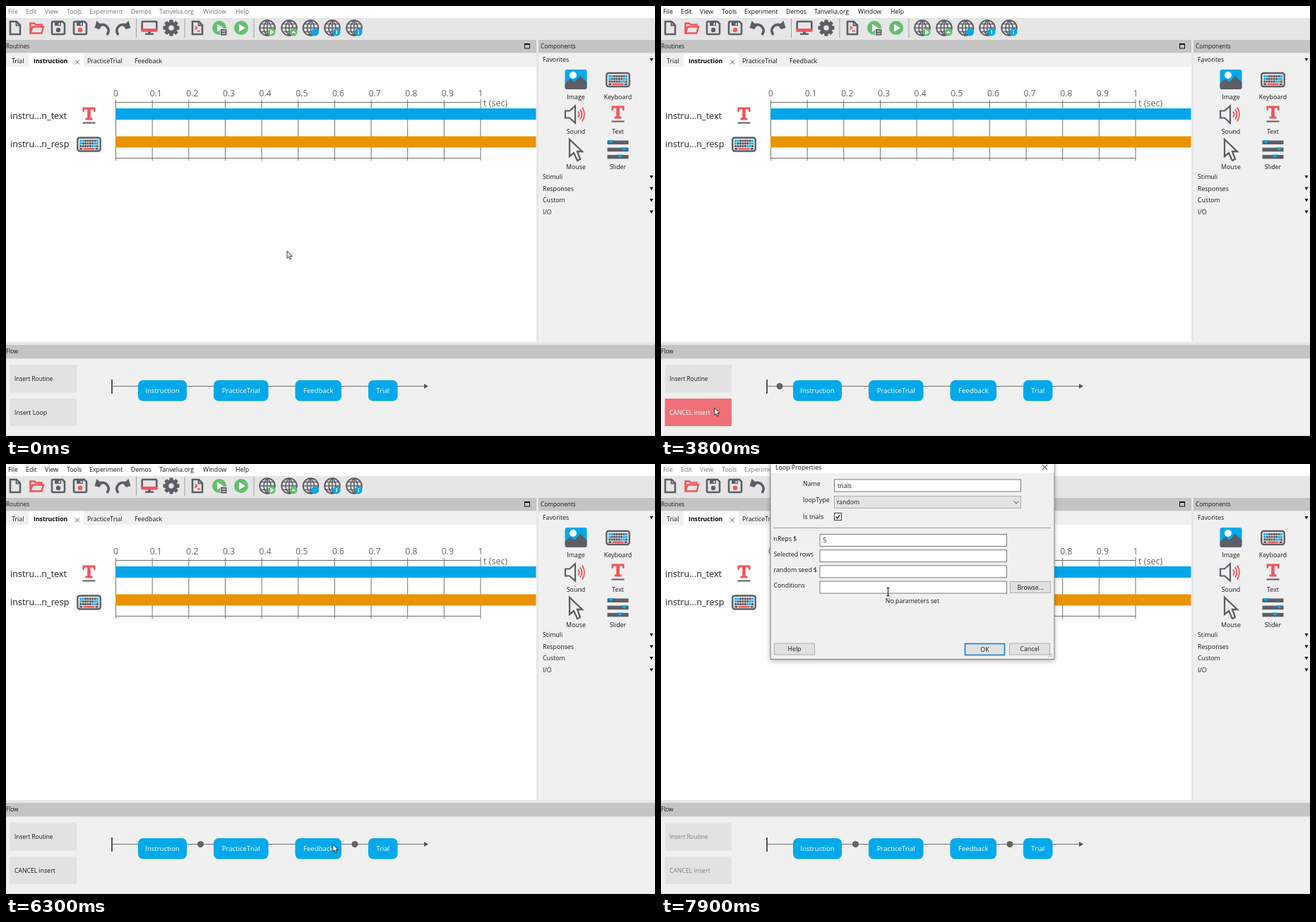
An HTML page that plays this animation: 919x609 px, repeating every 8 s.

```html
<!DOCTYPE html>
<html>
<head>
<meta charset="utf-8">
<style>
html, body { margin: 0; width: 100%; height: 100%; overflow: hidden; background: #e6e6e6; }
svg { display: block; width: 919px; height: 609px; }
text { font-family: "Open Sans", "Noto Sans", sans-serif; white-space: pre; }
</style>
</head>
<body>
<script>
const GREY = '#5e5e66', RED = '#f2545b', BLUE = '#02a9ea', GREEN = '#62c16b';
const PANEL = '#f0f0f0', FRAME = '#e6e6e6';

// SVG helpers; text is placed by its vertical middle
const rect = (x, y, w, h, fill, more = '') =>
  `<rect x="${x}" y="${y}" width="${w}" height="${h}" fill="${fill}" ${more}/>`;
const text = (x, y, s, size = 8.8, fill = '#1a1a1a', more = '') =>
  `<text x="${x}" y="${y + size * 0.35}" font-size="${size}" fill="${fill}" ${more}>${s}</text>`;
const label = (x, y, s, size, fill) => text(x, y, s, size, fill, 'text-anchor="middle"');
const path = (d, fill = 'none', stroke = 'none', width = 1) =>
  `<path d="${d}" fill="${fill}" stroke="${stroke}" stroke-width="${width}"/>`;
const line = (d, color = GREY, width = 2.6) => path(d, 'none', color, width);
const circle = (x, y, r, fill, more = '') => `<circle cx="${x}" cy="${y}" r="${r}" fill="${fill}" ${more}/>`;
const at = (x, y, ...parts) => `<g transform="translate(${x} ${y})">${parts.join('')}</g>`;
const list = (n, f) => Array.from({ length: n }, (_, i) => f(i)).join('');

// Icons, all drawn around 0,0
const page = line('M-7-9H2L7-4V9H-7Z') + line('M1.5-9V-3.5H7', GREY, 1.8);
const folder = line('M-8.5 7V-6.5H-3L-1-4.5H7.5V-1', RED) + path('M-8.5 7.5L-5.5-1.5H10L7.5 7.5Z', FRAME, RED, 2.4);
const floppy = mark => line('M-9-7Q-9-9-7-9H6L9-6V7Q9 9 7 9H-7Q-9 9-9 7Z') +
  rect(-5, -8, 9, 5, GREY) + rect(0.5, -7, 2, 3, FRAME) + circle(0, 3, 3.2, mark);
const undo = line('M-7-3Q5-8 9 2Q10 5 7 10', GREY, 3.6) + path('M-10.5 0L-7.5-10L0-3L-4 2Z', GREY);
const redo = `<g transform="scale(-1 1)">${undo}</g>`;
const monitor = rect(-10.3, -9, 20.6, 13, FRAME, `rx="1" stroke="${GREY}" stroke-width="2.6"`) +
  rect(-11.5, 1, 23, 4.5, RED, 'rx="1"') + rect(-2, 5.5, 4, 3, GREY) + rect(-6, 7.5, 12, 2.4, GREY);
const gear = list(8, i => rect(-2.7, -11.5, 5.4, 6, GREY, `rx="1" transform="rotate(${i * 45})"`)) +
  circle(0, 0, 6.4, FRAME, `stroke="${GREY}" stroke-width="5.2"`);
const script = page + line('M-3.5-2.5L-0.5 0L-3.5 2.5M0 4.5H4', RED, 1.8);
const play = circle(0, 0, 10, GREEN) + path('M-3-5.5L6 0L-3 5.5Z', '#fff');
const playList = play + rect(1.5, 1.5, 9.5, 9.5, GREY, `rx="1" stroke="${FRAME}"`) +
  line('M3.5 4.5H9M3.5 7.8H9', '#fff', 1.1);
const globe = (color, mark) => circle(0, 0, 10.8, FRAME, `stroke="${GREY}" stroke-width="2"`) +
  line('M0-11V11M-11 0H11M-9-5.5H9M-9 5.5H9M0-11Q-10 0 0 11M0-11Q10 0 0 11', GREY, 1.6) +
  circle(6.2, 6, 5.4, color) + line(mark, '#fff', 1.3);
const letterT = path('M-9-11H9V-4.5H7L6-8H2.3V4H5V7H-5V4H-2.3V-8H-6L-7-4.5H-9Z', RED) + rect(-9, 10, 18, 2, GREY);
const keyboard = rect(-16.2, -9.5, 32.4, 19, '#ececec', `rx="3" stroke="${GREY}" stroke-width="2.4"`) +
  list(3, r => list(8, c => rect(-13.2 + c * 3.4, -6.5 + r * 3.8, 2.8, 2.9,
    (c + r) % 7 < 2 ? BLUE : '#55555d'))) +
  rect(-13.2, 5, 4, 2.5, '#55555d') + rect(-8, 5, 16, 2.5, RED) + rect(9.2, 5, 4, 2.5, '#55555d');
const picture = rect(-15.5, -14, 31, 28, BLUE, 'rx="3"') + circle(-4, -6, 5, '#fff') +
  path('M-15.5 6L-8-1L-2 4L6-5L15.5 4V11Q15.5 14 12.5 14H-12.5Q-15.5 14-15.5 11Z', GREY);
const speaker = line('M-15-5H-9L-1-12V12L-9 5H-15Z', GREY, 2.2) +
  line('M3-4Q6 0 3 4M6-7Q11 0 6 7M9-10Q15 0 9 10', RED, 1.8);
const bigArrow = line('M-9-15V9L-3 4L2 15L6 13L2 2H9Z', GREY, 2.3);
const sliders = list(3, i => rect(-15, -12.5 + i * 10.2, 30, 5.5, GREY) +
  at([-10, 9, 3][i], -13 + i * 10.2, path('M-4.5 0H4.5L0 5Z', BLUE)));

const menu = [[3, 'File'], [28, 'Edit'], [55, 'View'], [86, 'Tools'], [118, 'Experiment'], [177, 'Demos'],
  [217, 'Tanvelia.org'], [279, 'Window'], [325, 'Help']];
const toolbar = [[13, page], [43, folder], [74, floppy(GREY)], [105, floppy(RED)], [136, undo], [166, redo],
  [203, monitor], [234, gear], [271, script], [302, playList], [333, play],
  [370, globe(GREEN, 'M5 3.5L8.5 6L5 8.5Z')], [401, globe(GREEN, 'M4 7.5L6 5L8.5 7.5')],
  [431.5, globe(BLUE, '')], [462, globe(BLUE, 'M6.2 3V9')], [493, globe(BLUE, 'M6.2 3V4.2M6.2 5.2V9')]];
const palette = [[807, 104, picture, 'Image'], [866.5, 104.5, keyboard, 'Keyboard'],
  [807, 153.5, speaker, 'Sound'], [866.5, 152.5, letterT, 'Text'],
  [807, 204, bigArrow, 'Mouse'], [866.5, 203, sliders, 'Slider']];
const groups = [[76, 'Favorites'], [242, 'Stimuli'], [258.5, 'Responses'], [275, 'Custom'], [291.5, 'I/O']];
const routines = [[187, 69, 'Instruction'], [294, 77.5, 'PracticeTrial'], [409.5, 65.5, 'Feedback'], [513, 41.5, 'Trial']];

const header = rect(0, 0, 919, 17, '#fff') +
  `<g id="menu">${menu.map(([x, s]) => text(x, 8, s, 8.8, 'inherit')).join('')}</g>` +
  toolbar.map(([x, icon]) => at(x, 31, icon)).join('') +
  [184, 252.5, 350.5].map(x => rect(x, 18, 1, 27, '#a0a0a0')).join('') +
  rect(0, 48, 751, 18.5, '#c4c4c4') + rect(754, 48, 165, 18.5, '#c4c4c4') +
  text(0, 57, 'Routines', 8.1) + text(757, 57, 'Components', 8.3) +
  rect(734.5, 53.5, 7, 6.5, 'none', 'stroke="#111"') + rect(734, 53, 8, 2, '#111');

const tabs = rect(0, 66.5, 751, 20, PANEL) + rect(32, 67, 78, 20, '#fff') + rect(0, 86, 751, 390, '#fff') +
  text(8, 78, 'Trial') + text(39, 78, 'Instruction', 8.7, '#000', 'font-weight="700"') +
  line('M98 76.5L104 82.5M104 76.5L98 82.5', '#555', 1) +
  text(115, 78, 'PracticeTrial') + text(182, 78, 'Feedback', 8.9);

const tickX = i => 155.5 + i * 51.65;
const timeline = line('M155 136.5H672M155 215.5H672', '#707070', 1) +
  list(11, i => rect(tickX(i) - 0.5, i == 10 ? 132 : 133, 1, i == 10 ? 87 : 86, '#707070') +
    text(tickX(i) - 3.5, 123.5, i % 10 ? '0.' + i : i / 10, 12.2, '#666')) +
  text(676, 137.5, 't (sec)', 12.6, '#666') +
  rect(155, 145, 595.5, 16, '#02a5e9') + rect(155, 184.5, 595.5, 16, '#e99400') +
  text(6, 156, 'instru...n_text', 12.6, '#222') + text(6, 195.5, 'instru...n_resp', 12.6, '#222') +
  at(117.5, 154.5, letterT) + at(117.5, 196, keyboard);

const components = rect(754, 66.5, 165, 409.5, PANEL) +
  groups.map(([y, s]) => text(760, y, s) + path(`M911.5 ${y - 2}h5l-2.5 4.5z`, '#111')).join('') +
  palette.map(([x, y, icon, s], i) => at(x, y, icon) + label(x, 128.5 + (i >> 1) * 49.7, s, 8.9)).join('');

const flow = rect(0, 480, 919, 19.5, '#c4c4c4') + rect(0, 499.5, 919, 107.5, PANEL) + text(0, 489.5, 'Flow', 8.2) +
  rect(5.5, 508, 94.5, 39.5, '#e2e2e2') + text(12, 528.5, 'Insert Routine', 8.3, '#1a1a1a', 'id="routine"') +
  rect(5.5, 556, 94.5, 39, '#e2e2e2', 'id="loopBox"') + text(12, 576, 'Insert Loop', 8.7, '#1a1a1a', 'id="loop"') +
  line('M150 538.5H594', '#707070', 1) + rect(149, 529, 2, 20, '#555') + path('M592 535L598 538.5L592 542Z', '#555') +
  routines.map(([x, w, s]) => rect(x, 530, w, 29.5, BLUE, 'rx="7"') + label(x + w / 2, 545, s, 9.6, '#fff')).join('') +
  circle(0, 538.5, 4.5, '#626268', 'id="dotA"') + circle(0, 538.5, 4.5, '#626268', 'id="dotB"');

const field = (x, y, w, s = '') => rect(x, y, w, 17, '#fff', 'stroke="#7a7a7a"') + text(x + 4.5, y + 8.5, s, 8.7);
const button = (x, y, w, s, edge = '#adadad', width = 1) =>
  rect(x, y, w, 16, '#e1e1e1', `stroke="${edge}" stroke-width="${width}"`) + label(x + w / 2, y + 8.3, s);
const dialog = rect(155, -10, 402, 286.5, PANEL, 'stroke="#7f7f7f" filter="url(#shadow)"') +
  rect(155.5, -10, 401, 23, '#fff') + text(162, 4.5, 'Loop Properties') +
  line('M540 1L547 8M547 1L540 8', '#111', 1) +
  text(201, 28, 'Name') + text(201, 51, 'loopType') + text(201, 75, 'Is trials') +
  field(245.5, 22, 264, 'trials') + rect(245.5, 45.5, 264, 17, '#e3e3e3', 'stroke="#adadad"') +
  text(249, 54, 'random', 8.7) + line('M499.5 52.5L503 56L506.5 52.5', '#444', 1) +
  rect(245.5, 69.5, 10, 10, '#fff', 'stroke="#333"') + line('M247.5 74.5L249.7 77L253.5 72', '#111', 1.2) +
  rect(159, 90, 393, 1, '#a0a0a0') +
  ['nReps $', 'Selected rows', 'random seed $', 'Conditions'].map((s, i) =>
    text(159.5, 105.5 + i * 22.1, s) + field(225, 99.5 + i * 22.2, 264.5, i ? '' : '5')).join('') +
  button(494.5, 166.5, 57, 'Browse...') + label(356, 194, 'No parameters set') +
  button(160.5, 254, 57, 'Help') + button(430.5, 254.5, 56, 'OK', '#1a80d4', 1.6) + button(493.5, 254, 57, 'Cancel') +
  line('M548 274L554 268M551 274L554 271', '#aaa', 1);

document.body.innerHTML = `<svg viewBox="0 0 919 609">
  <defs><filter id="shadow" x="-10%" y="-10%" width="120%" height="120%">
    <feDropShadow dx="0" dy="2" stdDeviation="3" flood-opacity=".3"/></filter></defs>
  ${rect(0, 0, 919, 609, FRAME) + header + tabs + timeline + components + flow}
  <g id="dialog">${dialog}</g>
  <g id="arrow">${path('M0 0V10.2L2.4 8L4 11.8L5.7 11L4.1 7.4H7.3Z', '#fff', '#222', 0.9)}</g>
  <g id="beam">${line('M-2-5.5H2M0-5.5V5.5M-2 5.5H2', '#111', 1)}</g>
</svg>`;

// Pointer stops: time, x, y
const stops = [[0, 398, 347], [900, 119, 533], [1300, 65, 571], [3700, 65, 571], [4400, 258, 538], [4600, 268, 536],
  [4800, 278, 536], [4900, 278, 536], [5100, 280, 538], [5600, 280, 538], [5700, 287, 538], [6500, 495.5, 539],
  [7200, 495.5, 539], [7700, 412, 463], [7900, 321.5, 181]];

function pointer(t) {
  const i = stops.findIndex(s => s[0] > t);
  if (i < 0) return stops[stops.length - 1].slice(1);
  const [t0, x0, y0] = stops[i - 1], [t1, x1, y1] = stops[i];
  const p = (t - t0) / (t1 - t0), e = p * p * (3 - 2 * p);
  return [x0 + (x1 - x0) * e, y0 + (y1 - y0) * e];
}

const el = id => document.getElementById(id);
const set = (id, attrs) => { for (const k in attrs) el(id).setAttribute(k, attrs[k]); };
const show = (id, on) => set(id, { visibility: on ? 'visible' : 'hidden' });

function draw(t) {
  const [x, y] = pointer(t);
  const hover = x > 5 && x < 100 && y > 556 && y < 595;
  const focused = t >= 1900 && t < 6900, inserting = t >= 2000, modal = t >= 7100;
  const ink = modal ? '#808080' : '#1a1a1a';
  set('menu', { fill: focused ? '#111' : '#777' });
  set('routine', { fill: ink });
  set('loopBox', { fill: hover ? '#f07078' : '#e2e2e2' });
  set('loop', { fill: hover ? '#fff' : ink });
  el('loop').textContent = inserting ? 'CANCEL insert' : 'Insert Loop';

  // Loop ends snap to the gap nearest the pointer
  set('dotA', { cx: x < 221 && t < 5000 ? 168 : 275.5 });
  set('dotB', { cx: x < 442 && !modal ? 391 : 494 });
  show('dotA', inserting);
  show('dotB', t >= 5300);

  const [opacity, scale] = t < 7200 ? [0.35, 0.965] : t < 7300 ? [0.82, 0.9925] : [1, 1];
  set('dialog', { opacity, transform: `translate(356 100) scale(${scale}) translate(-356 -100)` });
  show('dialog', modal);

  const typing = modal && y < 184;
  set(typing ? 'beam' : 'arrow', { transform: `translate(${x} ${y})` });
  show('beam', typing);
  show('arrow', !typing);
}

// The screen refreshes ten times a second
function tick() {
  draw(Math.floor(performance.now() % 8000 / 100) * 100);
  requestAnimationFrame(tick);
}
tick();
</script>
</body>
</html>
```
